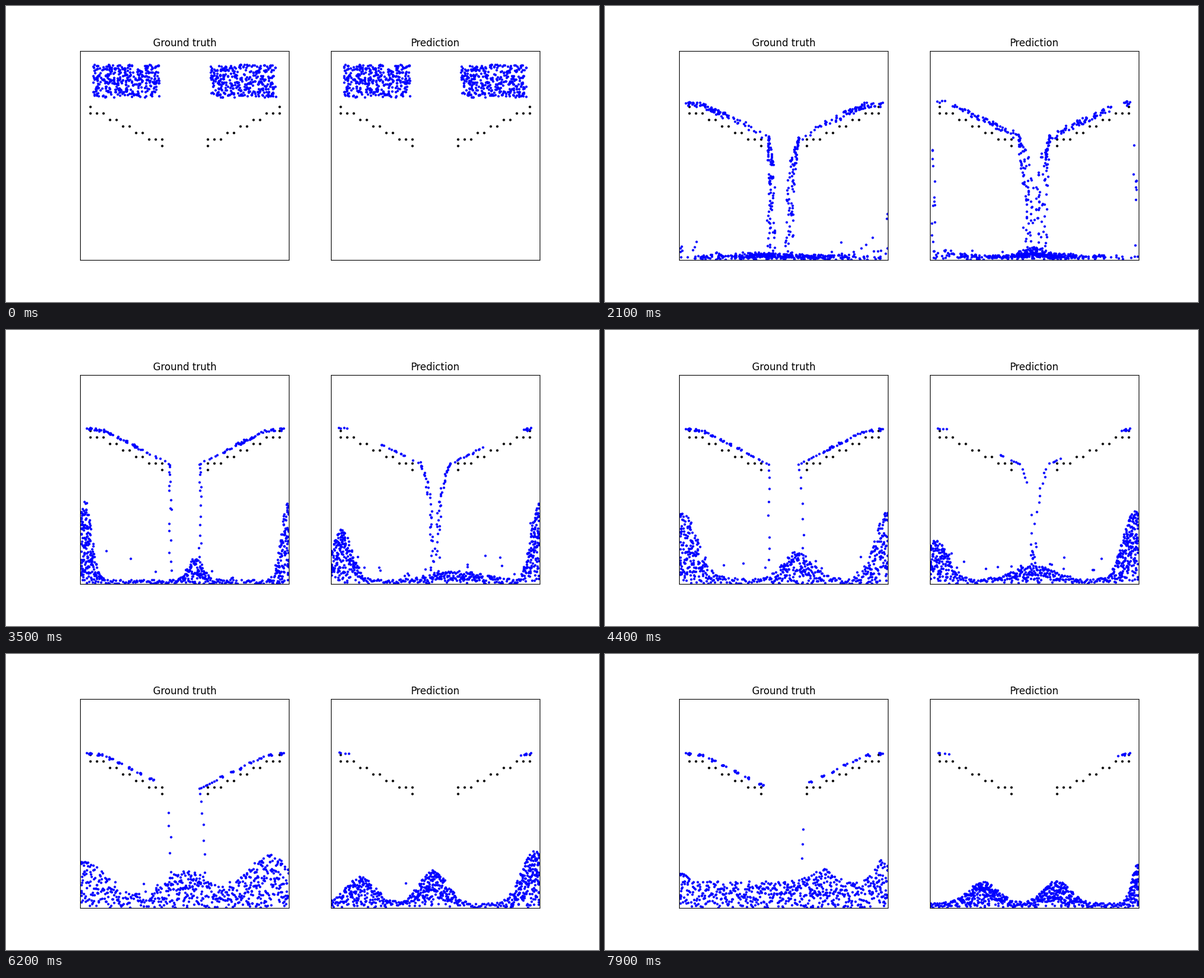
Write a matplotlib script that moves like this. It is 1000 by 500 pixels and loops after 8000 ms.

```python
import numpy as np
import matplotlib.pyplot as plt
from matplotlib.animation import FuncAnimation

FRAMES, STEP = 80, 100
W, TOP, BOTTOM = 352.27, 76.36, 428.64
LEFTS = (125.0, 547.73)
CELL = W / 32
MIRROR = 2 * 125 + W + 0.01      # a ramp at x has its twin at MIRROR - x - W / 2 * 0
SIDE = 360                       # particles in one block
G = 1.9
SLUMP = 7.0                      # time at which the blocks rest on the ramps
EDGE = 272                       # inner end of the left ramp
TIMES = (21, 35, 54, 70, 79)


def lerp(a, b, w):
    return a + (b - a) * w


def ramp(x):
    return np.interp(x, (133, 165, 275), (168, 172, 227))


class Stream:
    """Water of one ramp: block, slump, slide, fall, landing."""

    def __init__(self, rng, flip, exits, drift, held, reach, leak, width):
        self.flip, self.drift = flip, drift
        block = np.random.default_rng(5 + flip)
        u, v = block.random((2, SIDE))
        self.x0, self.y0 = 147 + 111 * u, 99 + 55 * v
        self.x7 = lerp(132, 264 + 10 * v, u) + rng.normal(0, 1, SIDE)
        top = np.interp(self.x7, (132, 145, 185, 250, 275), (152, 142, 143, 160, 185))
        low = np.minimum(ramp(self.x7) + 2, 216)
        self.lift = ramp(self.x7) - lerp(top, low, v)

        # water near the inner end leaves first
        far = EDGE - self.x7 + 0.8 * self.lift + rng.normal(0, 6, SIDE)
        order = np.argsort(far)
        self.out = np.empty(SIDE)
        self.out[order] = np.interp(np.arange(SIDE) / SIDE, *exits)

        # the last drops stay on the ramp in creeping clumps
        last = order[SIDE - held:]
        self.held = last[np.argsort(self.x7[last])]
        self.out[self.held] = 1e6
        self.creep = reach * (np.arange(held) * 7 // held) / 6
        self.rest = 140 + rng.normal(0, 3, held)
        self.low = rng.uniform(-2.5, 1.5, held)

        # a few spill over the outer end
        outer = np.setdiff1d(np.argsort(self.x7)[:60], self.held)
        self.leak = rng.choice(outer, leak, replace=False)
        self.out[self.leak] = rng.uniform(9, 17, leak)

        late = np.minimum(self.out, 200)
        self.v = np.interp(late, (7, 20, 40), (17, 10, 5)) * rng.uniform(0.9, 1.1, SIDE)
        self.jit = rng.uniform(-2, 2, SIDE) * width * np.interp(late, (8, 16, 30), (1.2, 1, 0.3))
        self.ye = ramp(EDGE) - self.lift_at(late)
        self.ye[self.leak] = 172
        floor = np.interp(late, (12, 25, 45), (427, 415, 385)) - rng.uniform(0, 10, SIDE)
        fall = (np.sqrt(self.v ** 2 + 2 * G * (floor - self.ye)) - self.v) / G
        self.land = self.out + fall

    def lift_at(self, t):
        return self.lift * np.exp(-np.maximum(t - SLUMP, 0) / 12)

    def path(self, y, t):
        bend = np.interp(t, (21, 40), self.drift)
        return EDGE + 4 + bend * (1 - np.exp(-np.maximum(y - 226, 0) / 45))

    def at(self, t):
        y7 = ramp(self.x7) - self.lift
        if t <= SLUMP:
            w = (t / SLUMP) ** 2
            x, y = lerp(self.x0, self.x7, w), lerp(self.y0, y7, w)
        else:
            w = np.clip((t - SLUMP) / (self.out - SLUMP), 0, 1) ** 1.3
            x = lerp(self.x7, EDGE + 4, w)
            h = self.held
            k = np.clip((t - SLUMP) / 14, 0, 1)
            goal = self.rest + self.creep * np.interp(t, (21, 79), (0.5, 1))
            x[h] = lerp(self.x7[h], goal, k)
            y = ramp(x) - self.lift_at(t)
            y[h] += k * self.low

            dt = np.minimum(t, self.land) - self.out
            fy = self.ye + self.v * dt + G * dt * dt / 2
            fx = self.path(fy, t) + self.jit * np.clip(dt / 3, 0, 1)
            fx[self.leak] = 131 + self.jit[self.leak] * 0.3
            x, y = np.where(dt > 0, fx, x), np.where(dt > 0, fy, y)
        return (MIRROR - x if self.flip else x), y


class Panel:
    def __init__(self, left, seed, waves, crest, streams):
        rng = np.random.default_rng(seed)
        self.dx = left - LEFTS[0]
        self.waves = np.array(waves, float)
        self.streams = [Stream(rng, flip, *s) for flip, s in enumerate(streams)]
        n = 2 * SIDE
        start = np.concatenate([s.x0 if not s.flip else MIRROR - s.x0 for s in self.streams])
        self.along = np.empty(n)
        self.along[np.argsort(start + rng.normal(0, 80, n))] = (np.arange(n) + 0.5) / n
        self.height = rng.random(n) ** crest
        self.land = np.concatenate([s.land for s in self.streams])

    def pool(self, t):
        """Spread the water under a surface made of three moving humps."""
        now = [np.interp(t, TIMES, col) for col in self.waves.T]
        grid = np.linspace(0, W, 400)
        surface = np.full(400, now[0])
        for mid, wide, high in np.reshape(now[1:], (3, 3)):
            surface += high * np.exp(-((grid - mid) / wide) ** 2)
        area = np.cumsum(surface)
        x = np.interp(self.along, area / area[-1], grid)
        return x + LEFTS[0], BOTTOM - self.height * np.interp(x, grid, surface)

    def at(self, t):
        x, y = np.hstack([s.at(t) for s in self.streams])
        px, py = self.pool(t)
        w = np.clip((t - self.land) / 4, 0, 1)
        x = lerp(x, px, 1 - (1 - w) ** 2)
        y = lerp(y, py, w)
        return np.clip(x, 126.5, 475.5) + self.dx, np.minimum(y, 428)


MIRROR = 602.27

# per time: depth, then middle, width and height of each hump
WAVES_A = [(8, 0, 4, 45, 130, 60, 6, 352, 4, 80),
           (7, 8, 16, 135, 195, 18, 38, 350, 16, 130),
           (12, 0, 60, 88, 205, 50, 55, 352, 45, 95),
           (22, 15, 40, 38, 150, 60, 38, 285, 60, 52),
           (45, 5, 12, 15, 240, 25, 22, 342, 18, 36)]
WAVES_B = [(7, 30, 10, 14, 175, 30, 14, 250, 40, 3),
           (7, 18, 24, 85, 215, 60, 15, 350, 18, 130),
           (9, 0, 35, 45, 130, 35, 32, 340, 38, 100),
           (5, 100, 35, 46, 215, 33, 78, 346, 25, 78),
           (8, 90, 35, 36, 214, 32, 38, 350, 14, 65)]

# share of water that has left the ramp, against time
EXIT_A = ((0, .5, .77, .83, .91), (7.3, 11, 21, 35, 75))
EXIT_B = ((0, .5, .75, .92, .99), (7.3, 11, 21, 35, 54))

panels = [
    Panel(LEFTS[0], 11, WAVES_A, 0.9,
          [(EXIT_A, (4, 0), 44, 122, 0, 3.2), (EXIT_A, (16, -8), 33, 115, 0, 3.2)]),
    Panel(LEFTS[1], 23, WAVES_B, 0.65,
          [(EXIT_B, (16, 22), 4, 18, 22, 5), (EXIT_B, (15, 26), 9, 20, 14, 5)]),
]

# fixed dots of the two ramps
i = np.arange(12)
row = 22.5 - np.clip((i - 1) // 2, 0, 4)
bx = LEFTS[0] + CELL * (1.5 + np.append(i, (0, 11)))
by = np.tile(BOTTOM - CELL * np.append(row, (23.5, 17.5)), 2)
bx = np.append(bx, MIRROR - bx)

fig, axes = plt.subplots(1, 2, figsize=(10, 5), dpi=100)
dots = []
for ax, left, title in zip(axes, LEFTS, ("Ground truth", "Prediction")):
    ax.set_title(title)
    ax.set_xlim(left, left + W)
    ax.set_ylim(BOTTOM, TOP)
    ax.set_xticks([])
    ax.set_yticks([])
    ax.set_aspect(1)
    ax.plot(bx + left - LEFTS[0], by, "o", ms=2, color="black")
    dots += ax.plot([], [], "o", ms=2, color="blue")


def draw(frame):
    for line, panel in zip(dots, panels):
        line.set_data(*panel.at(frame))
    return dots


anim = FuncAnimation(fig, draw, frames=FRAMES, interval=STEP, init_func=lambda: draw(0),
                     repeat=True, repeat_delay=0, blit=False)
plt.show()
```
